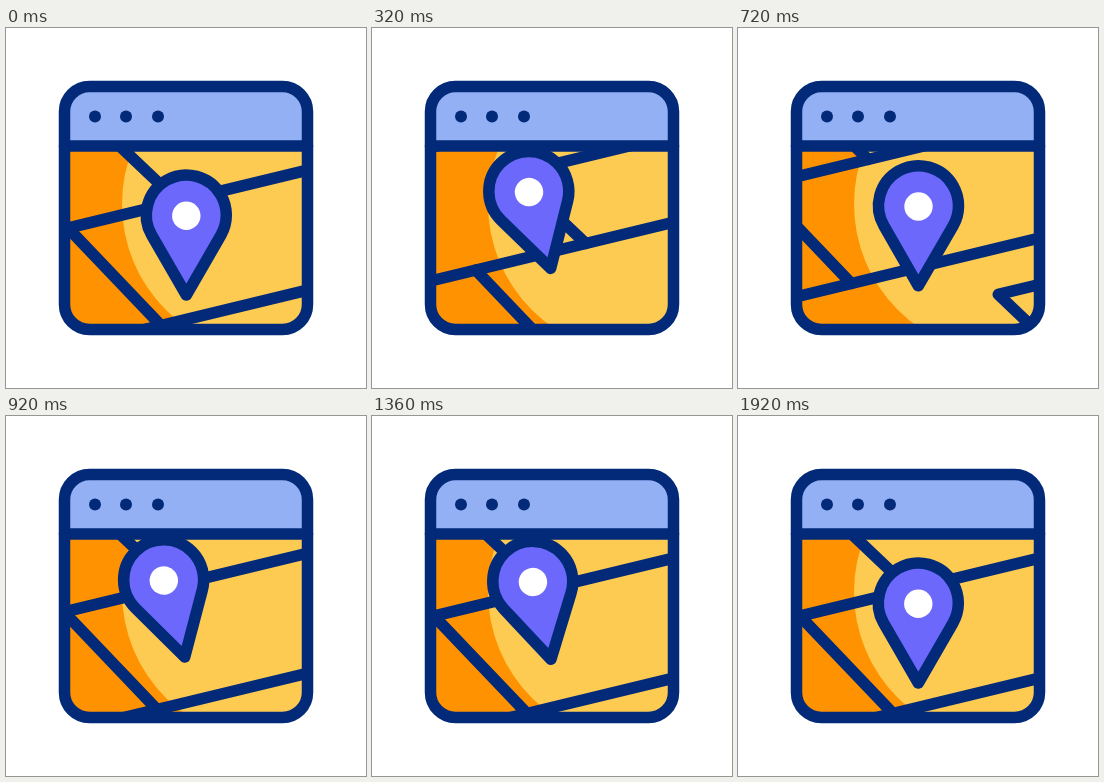
These frames come from a looping animation (360x360 px, 2 s). An HTML page with a canvas:

```html
<!DOCTYPE html>
<html lang="en">
<head>
<meta charset="utf-8">
<title>Map pin</title>
<style>
html, body { margin: 0; width: 100%; height: 100%; overflow: hidden; background: #fff; }
canvas { display: block; width: 100vmin; height: 100vmin; }
</style>
</head>
<body>
<canvas id="stage"></canvas>
<script>
const SIZE = 360, LOOP = 2000, STEP = 40;
const NAVY = '#022a78', SKY = '#94b0f4', ORANGE = '#ff9200', YELLOW = '#fdcb52', VIOLET = '#6c68fb';
const LINE = 11.5;
const SLOPE = -57 / 236;
const TILE = [203, 204.5];

// time, lift, tilt in degrees
const HOPS = [
  [20, 0, 0], [300, 27, -16], [605, 0, 8.5], [880, 27, -16],
  [1165, 1, 8], [1430, 27, -16], [1710, 0, 8], [1900, 0, 0]
];

const canvas = document.getElementById('stage');
const ctx = canvas.getContext('2d');

const clamp = v => Math.min(1, Math.max(0, v));
const smooth = v => v * v * (3 - 2 * v);

// cubic-bezier(.5, 0, .5, 1)
function ease(x) {
  let lo = 0, hi = 1;
  for (let i = 0; i < 20; i++) {
    const s = (lo + hi) / 2;
    if (1.5 * s * (1 - s) + s * s * s < x) lo = s; else hi = s;
  }
  return smooth(lo);
}

function hopAt(t) {
  for (let i = 1; i < HOPS.length; i++) {
    const a = HOPS[i - 1], b = HOPS[i];
    if (t < b[0]) {
      const k = ease(clamp((t - a[0]) / (b[0] - a[0])));
      return { lift: a[1] + (b[1] - a[1]) * k, tilt: a[2] + (b[2] - a[2]) * k };
    }
  }
  return { lift: 0, tilt: 0 };
}

function disc(x, y, r, color) {
  ctx.beginPath();
  ctx.arc(x, y, r, 0, Math.PI * 2);
  ctx.fillStyle = color;
  ctx.fill();
}

function path(...pts) {
  ctx.beginPath();
  pts.forEach(([x, y]) => ctx.lineTo(x, y));
  ctx.stroke();
}

function frameBox() {
  ctx.beginPath();
  ctx.roundRect(58.5, 58.5, 243, 243, 25);
}

// point on a slanted road passing through (x0, y0)
const along = (x0, y0, x) => [x, y0 + (x - x0) * SLOPE];

function roads(dx, dy) {
  ctx.save();
  ctx.translate(dx, dy);
  path(along(62, 200, -500), along(62, 200, 800));
  path(along(298, 263, -500), along(298, 263, 800));
  path(along(99, 104, 800), [99, 104], along(62, 200, 172));
  path([62, 200], along(298, 263, 155));
  ctx.restore();
}

function pin({ lift, tilt }) {
  ctx.save();
  ctx.translate(180.3, 273 - lift);
  ctx.rotate(tilt * Math.PI / 180);
  ctx.beginPath();
  ctx.arc(0, -86, 40, Math.PI * 5 / 6, Math.PI / 6);
  ctx.lineTo(0, -6);
  ctx.closePath();
  ctx.fillStyle = VIOLET;
  ctx.fill();
  ctx.stroke();
  disc(0, -85.3, 14.2, '#fff');
  ctx.restore();
}

function draw(t) {
  const scale = canvas.width / SIZE;
  ctx.setTransform(scale, 0, 0, scale, 0, 0);
  ctx.fillStyle = '#fff';
  ctx.fillRect(0, 0, SIZE, SIZE);
  ctx.lineJoin = ctx.lineCap = 'round';
  ctx.strokeStyle = NAVY;
  ctx.lineWidth = LINE;

  ctx.save();
  frameBox();
  ctx.clip();
  ctx.fillStyle = ORANGE;
  ctx.fillRect(50, 50, 260, 260);
  disc(266, 176, 150, YELLOW);
  const k = smooth(clamp((t - 40) / 960));
  roads(TILE[0] * k, TILE[1] * k);
  roads(TILE[0] * (k - 1), TILE[1] * (k - 1));
  ctx.fillStyle = SKY;
  ctx.fillRect(50, 50, 260, 68);
  ctx.restore();

  [89, 120, 152].forEach(x => disc(x, 88.5, 6, NAVY));
  path([58.5, 118], [301.5, 118]);
  frameBox();
  ctx.stroke();
  pin(hopAt(t));
}

function resize() {
  const side = Math.min(innerWidth, innerHeight) || SIZE;
  canvas.width = canvas.height = Math.round(side * (devicePixelRatio || 1));
}

const start = performance.now();
function tick() {
  const t = (performance.now() - start) % LOOP;
  draw(Math.min(1920, Math.floor(t / STEP) * STEP));
  requestAnimationFrame(tick);
}

addEventListener('resize', resize);
resize();
tick();
</script>
</body>
</html>
```
